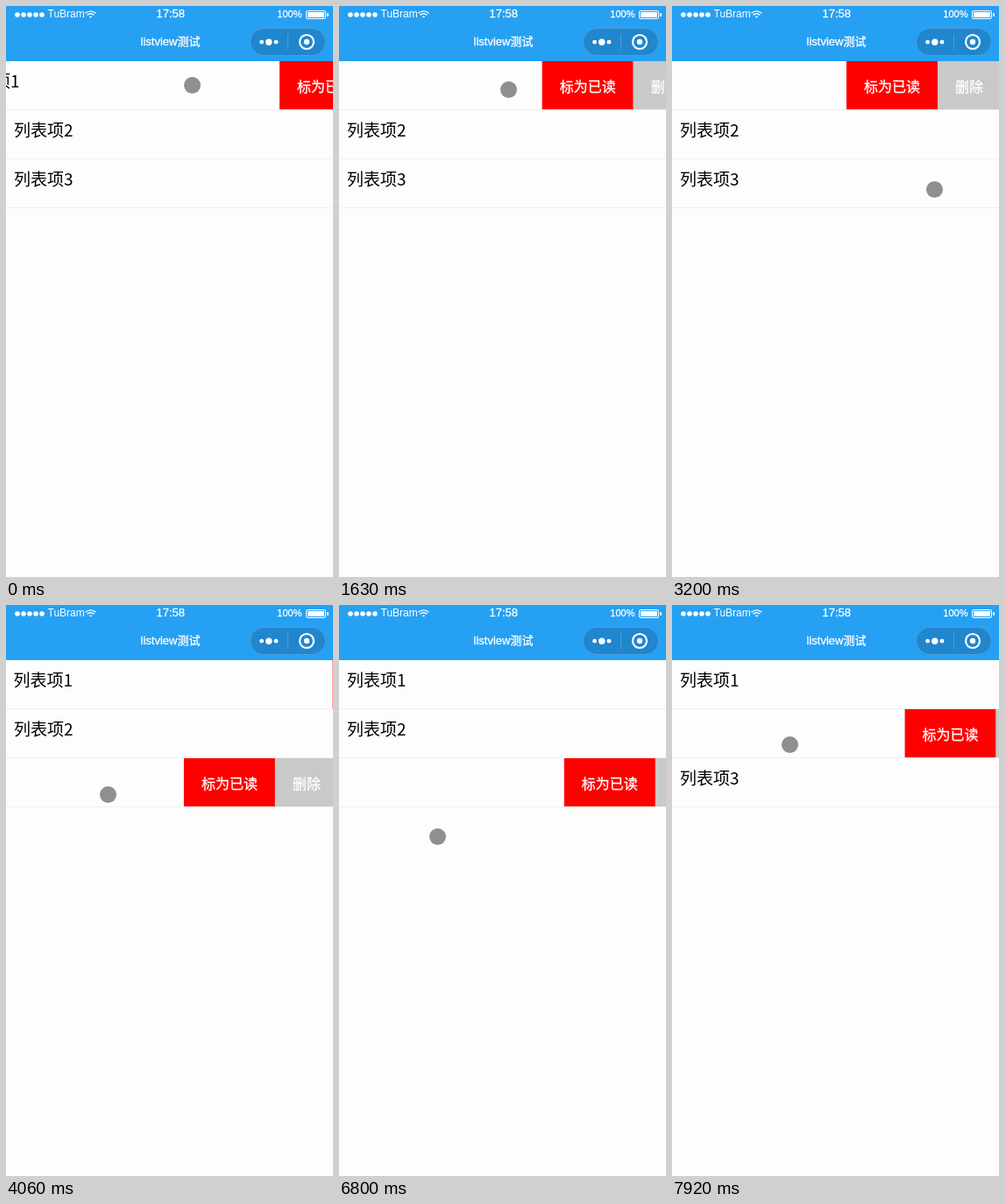
Animation, 373 px wide and 652 px high, one loop 8 s. Source, as an HTML page:

```html
<!DOCTYPE html>
<html lang="zh-CN">
<head>
<meta charset="utf-8">
<title>listview</title>
<style>
  html, body { margin: 0; width: 100%; height: 100%; overflow: hidden; background: #fdfdfd; }
  svg { display: block; width: 100vw; height: 100vh; }
  text { font-family: "Liberation Sans", "Noto Sans CJK SC", "Noto Sans CJK", sans-serif; fill: #fff; }
  .item { font: 350 19px "Noto Sans CJK SC", "Noto Sans CJK", sans-serif; fill: #000; }
  .button { font-size: 16px; }
  .button, .strong { stroke: #fff; stroke-width: .3; }
</style>
</head>
<body>
<svg viewBox="0 0 373 652">
  <rect width="373" height="652" fill="#fdfdfd"/>
  <g id="list"></g>

  <rect width="373" height="63" fill="#26a0f3"/>
  <g id="signal" fill="#fff"></g>
  <text x="47.5" y="13" font-size="12">TuBram</text>
  <g fill="none" stroke="#fff" stroke-width="1.4">
    <path d="M90.5 8.3Q96.5 3.4 102.5 8.3M92.6 10.4Q96.5 7.2 100.4 10.4"/>
    <path d="M94.7 12.2Q96.5 10.8 98.3 12.2L96.5 13.6Z" fill="#fff" stroke="none"/>
  </g>
  <text class="strong" x="187.8" y="13" font-size="13" text-anchor="middle">17:58</text>
  <text class="strong" x="309.3" y="13" font-size="11">100%</text>
  <rect x="342.5" y="5.5" width="22" height="9" rx="1.5" fill="none" stroke="#fff"/>
  <rect x="344" y="7" width="19" height="6" fill="#fff"/>
  <rect x="366" y="8" width="2" height="4" rx="1" fill="#fff"/>
  <text class="strong" x="187.5" y="45" font-size="13" text-anchor="middle">listview测试</text>

  <rect x="278.5" y="25.5" width="86" height="31" rx="15.5" fill="#2086cd" stroke="#4a9fda"/>
  <path d="M321.5 32V50" stroke="#4a9fda"/>
  <g fill="#fff">
    <circle cx="291.6" cy="41.2" r="2.4"/>
    <circle cx="299.8" cy="41.2" r="3.7"/>
    <circle cx="308" cy="41.2" r="2.4"/>
    <circle cx="343" cy="41" r="3.2"/>
  </g>
  <circle cx="343" cy="41" r="8" fill="none" stroke="#fff" stroke-width="2.2"/>

  <circle id="pointer" r="9.5" fill="#8f8f8f"/>
</svg>
<script>
const LOOP = 8000;
const OPEN = 174;        // width of both buttons
const SPRING = 102;      // ms, time constant of a sliding row
const $ = id => document.getElementById(id);

// Times at which each row starts to open or close, in turn.
const rowStates = [
  { open: true, toggles: [-225, 1317, 3210] },
  { open: false, toggles: [7708] },
  { open: false, toggles: [3479, 6680] }
];

// Turning points of the pointer: [ms, x, y].
const turns = [
  [0, 212.5, 90.5], [700, 305, 138], [1150, 300, 100], [1630, 193.5, 95.5],
  [2300, 270, 230], [3200, 299.5, 209.5], [4060, 116.5, 216.5], [5010, 313.5, 145.5],
  [6000, 313.5, 145.5], [6400, 137.5, 213.5], [6680, 137.5, 213.5], [6800, 112.5, 264.5],
  [7500, 241, 165], [7920, 134.5, 159.5], [LOOP, 134.5, 159.5]
];

// Share of the way left for a critically damped spring.
function remaining(elapsed) {
  const u = Math.max(0, elapsed) / SPRING;
  return (1 + u) * Math.exp(-u);
}

function rowOffset({ open, toggles }, t) {
  let offset = open ? OPEN : 0;
  for (const start of toggles) {
    open = !open;
    const goal = open ? OPEN : 0;
    offset = goal + (offset - goal) * remaining(t - start);
  }
  return offset;
}

function pointerAt(t) {
  const i = turns.findIndex(p => p[0] > t);
  const [t0, x0, y0] = turns[i - 1], [t1, x1, y1] = turns[i];
  const p = (t - t0) / (t1 - t0);
  const eased = p * p * (3 - 2 * p);
  return [x0 + (x1 - x0) * eased, y0 + (y1 - y0) * eased];
}

$("signal").innerHTML = [0, 1, 2, 3, 4]
  .map(i => `<circle cx="${13 + 7 * i}" cy="10" r="2.8"/>`).join("");

$("list").innerHTML = rowStates.map((_, i) => `
  <g transform="translate(0 ${63 + 56 * i})">
    <g class="row">
      <text class="item" x="9" y="30">列表项${i + 1}</text>
      <rect x="373" width="104" height="55" fill="#f00"/>
      <rect x="477" width="70" height="55" fill="#c9c9c9"/>
      <text class="button" x="393" y="34.5">标为已读</text>
      <text class="button" x="497" y="34.5">删除</text>
    </g>
    <rect y="55" width="373" height="1" fill="#efefef"/>
  </g>`).join("");

const rows = document.querySelectorAll(".row");

function draw(t) {
  rows.forEach((row, i) =>
    row.setAttribute("transform", `translate(${-rowOffset(rowStates[i], t)} 0)`));
  const [x, y] = pointerAt(t);
  $("pointer").setAttribute("cx", x);
  $("pointer").setAttribute("cy", y);
}

function tick() {
  draw(performance.now() % LOOP);
  requestAnimationFrame(tick);
}
tick();
</script>
</body>
</html>
```
